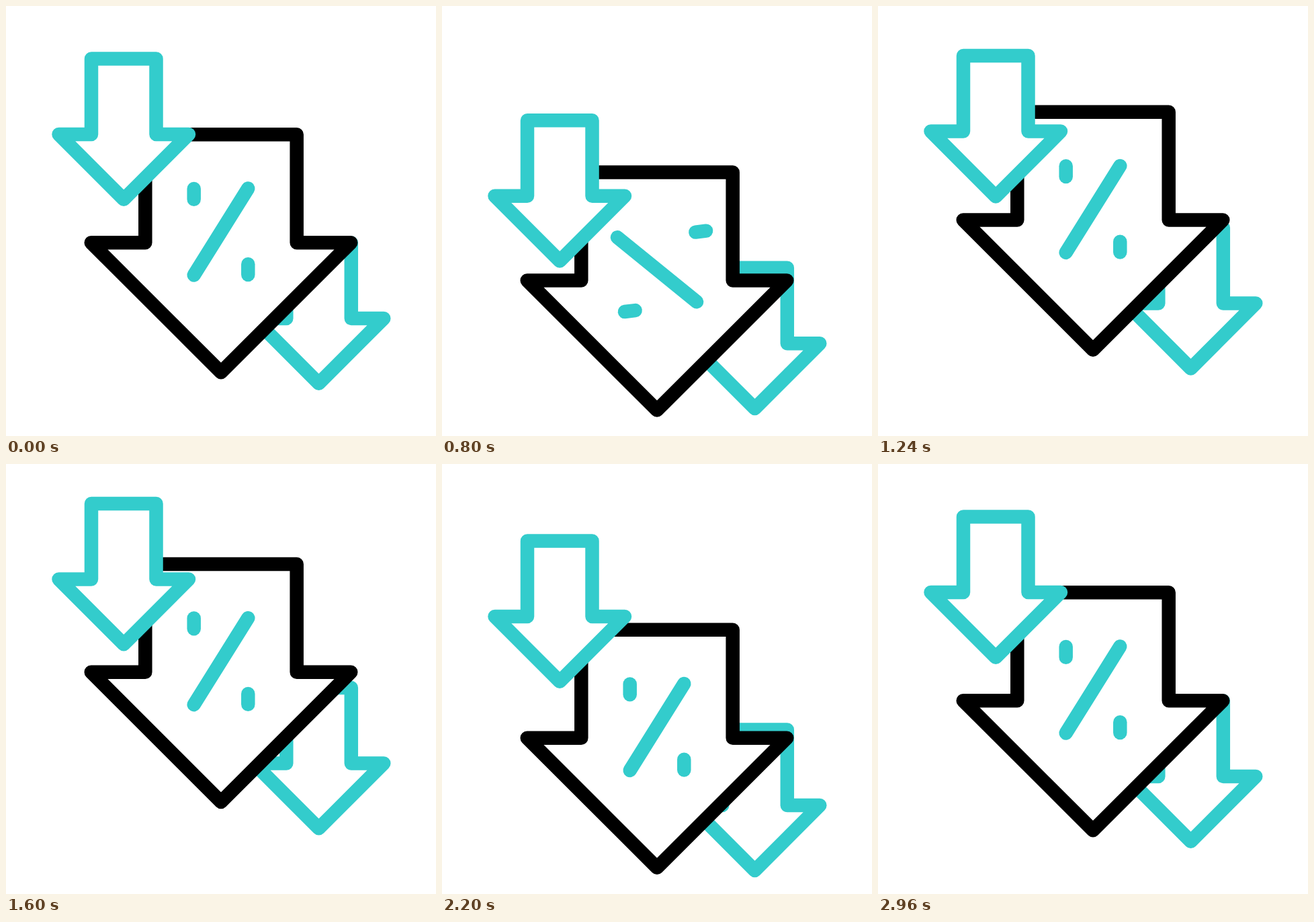
An HTML page that plays this animation: 640x640 px, repeating every 3000 ms.

```html
<!DOCTYPE html>
<html lang="en">
<head>
<meta charset="utf-8">
<title>Falling prices</title>
<style>
  html, body { margin: 0; width: 100%; height: 100%; overflow: hidden; background: #fff; }
  svg { display: block; width: 100%; height: 100%; }
  path { fill: #fff; stroke: #33cccc; stroke-width: 20.5; stroke-linecap: round; stroke-linejoin: round; }
  #main > path { stroke: #000; }
</style>
</head>
<body>
<svg viewBox="0 0 640 640">
  <defs>
    <path id="small" d="M127 78.5H223.5V191H272L175.25 287.8L78.5 191H127Z"/>
  </defs>
  <g id="right"><use href="#small" x="290.3" y="273.9"/></g>
  <g id="main">
    <path d="M207.3 191.3H432.7V352.2H513.3L320 545.3L126.7 352.2H207.3Z"/>
    <g transform="translate(320 336)">
      <g id="slash"><path d="M-40.3 64.5L40.3 -64.5"/></g>
      <g id="dotA"><path d="M0 -7.9V7.9"/></g>
      <g id="dotB"><path d="M0 -7.9V7.9"/></g>
    </g>
  </g>
  <g id="left"><use href="#small"/></g>
</svg>
<script>
  const LOOP = 3000, STEP = 40;

  // Vertical offsets as [time in ms, px]
  const drops = {
    left:  [[120, 0], [680, 100.2], [1440, -26], [2240, 36.4], [2960, 0]],
    main:  [[120, 0], [680, 64.2], [1440, -53.8], [2240, 56.3], [2960, 0]],
    right: [[120, 0], [680, 43], [1390, -30.8], [2240, 43.7], [2960, 0]]
  };

  // Half-turn swap of the two dots: start point and curve handle
  const dots = {
    dotA: { from: [-40.3, -56.2], handle: [-50.6, 86.8] },
    dotB: { from: [40.3, 56.2], handle: [84, -80] }
  };

  const ease = p => p * p * (3 - 2 * p);
  const progress = (t, start, end) => ease(Math.min(1, Math.max(0, (t - start) / (end - start))));
  const place = (id, transform) => document.getElementById(id).setAttribute('transform', transform);

  function valueAt(keys, t) {
    let value = keys[0][1];
    for (let i = 1; i < keys.length; i++) {
      const [start, a] = keys[i - 1], [end, b] = keys[i];
      if (t >= start) value = a + (b - a) * progress(t, start, end);
    }
    return value;
  }

  function draw(t) {
    for (const id in drops) place(id, `translate(0 ${valueAt(drops[id], t)})`);

    const turn = 180 * progress(t, 440, 1200);
    place('slash', `rotate(${-turn})`);

    const s = progress(t, 420, 1200);
    for (const id in dots) {
      const { from, handle } = dots[id];
      const [x, y] = from.map((v, i) => v * (1 - 2 * ease(s)) + handle[i] * 3 * s * (1 - s));
      place(id, `translate(${x} ${y}) rotate(${turn})`);
    }
  }

  let origin;
  function tick(now) {
    origin ??= now;
    draw(Math.floor((now - origin) % LOOP / STEP) * STEP);
    requestAnimationFrame(tick);
  }
  draw(0);
  requestAnimationFrame(tick);
</script>
</body>
</html>
```
